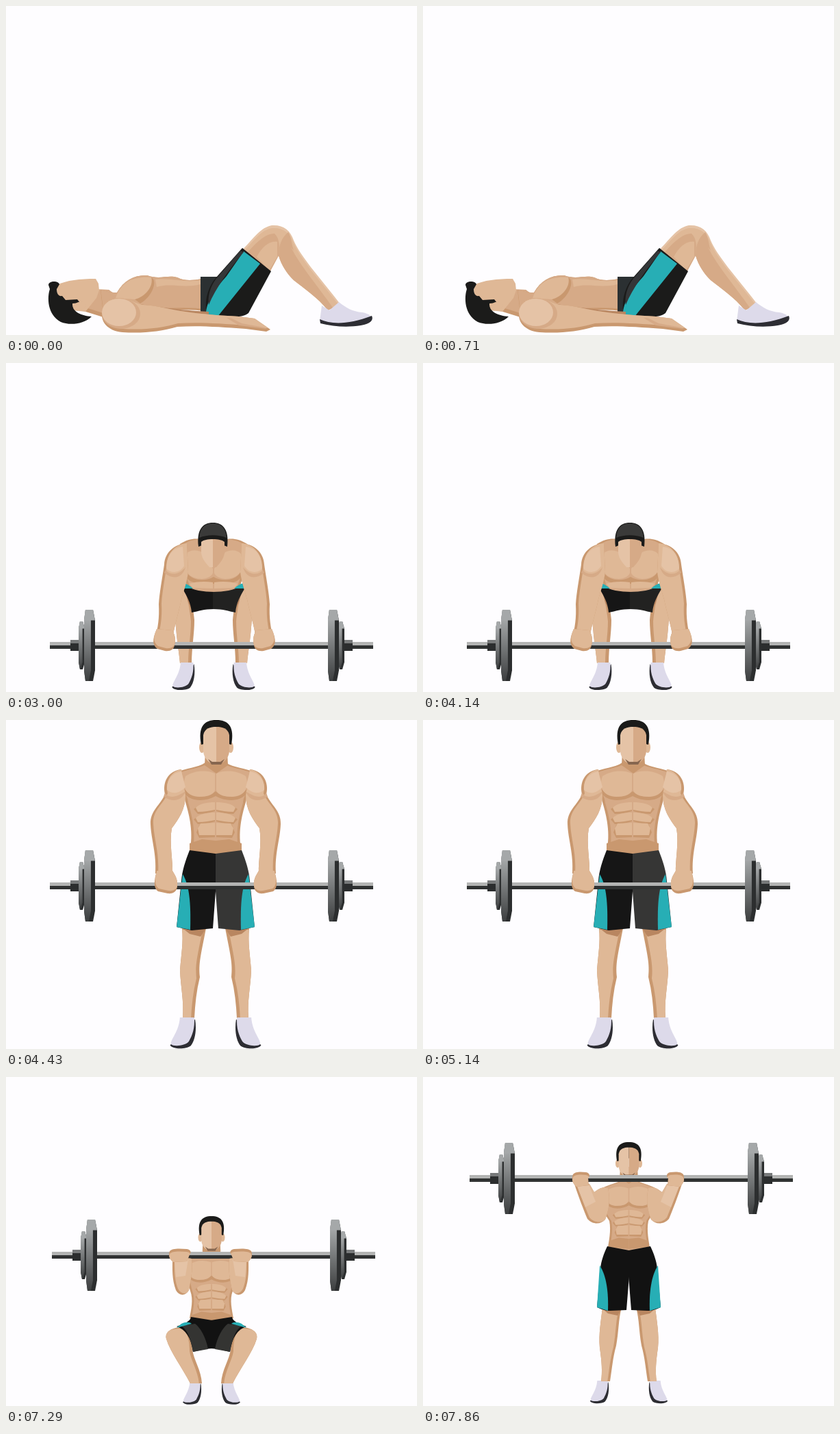
An HTML page with a canvas for the animation above (8000 ms loop, 600 px wide and 480 px high).

```html
<!DOCTYPE html>
<html>
<head>
<meta charset="utf-8">
<style>
  html, body { margin: 0; height: 100%; overflow: hidden; background: #fefdff; }
  canvas { display: block; width: 100%; height: 100%; }
</style>
</head>
<body>
<canvas id="stage" width="600" height="480"></canvas>
<script>
const ctx = document.getElementById('stage').getContext('2d');
const LIGHT = '#e5c3a6', SKIN = '#dfb896', MID = '#d6aa87', SHADE = '#c9986f', DEEP = '#b98660';
const BLACK = '#1b1b1a', TEAL = '#27aeb5', SHOE = '#dddaea', SOLE = '#2d2d33';
const LOOP = 8000;
let raised = false; // second pose of an exercise

const pick = (low, high) => raised ? high : low;

// Fills the path of the current pose; with `light`, a shifted copy leaves a shaded rim.
function shape(color, low, high = low, light, dx = 4, dy = 0) {
  const path = new Path2D(pick(low, high));
  ctx.fillStyle = color;
  ctx.fill(path);
  if (!light) return;
  ctx.save();
  ctx.clip(path);
  ctx.translate(dx, dy);
  ctx.fillStyle = light;
  ctx.fill(path);
  ctx.restore();
}

function oval(color, x, y, rx, ry, angle = 0) {
  ctx.fillStyle = color;
  ctx.beginPath();
  ctx.ellipse(x, y, rx, ry, angle, 0, 7);
  ctx.fill();
}

function at(x, y, sx, sy, draw) {
  ctx.save();
  ctx.translate(x, y);
  ctx.scale(sx, sy);
  draw();
  ctx.restore();
}

function both(cx, draw) {
  draw();
  at(2 * cx, 0, -1, 1, draw);
}

// ---------- lying figure ----------

function sideLeg() {
  at(pick(0, -1.5), pick(0, 2), 1, 1, () => {
    shape(LIGHT, 'M346 355 C362 338 372 323 388 320 C405 319 415 327 420 342 C425 354 434 366 445 381 C460 400 475 418 488 435 L470 444 C455 425 435 412 420 400 C410 390 402 378 398 364 L384 390Z',
      undefined, SKIN, 0, 4);
    shape(MID, 'M398 364 C398 350 402 338 412 330 C418 338 416 352 424 366 C440 388 462 416 478 440 L470 444 C455 425 435 412 420 400 C410 390 402 378 398 364Z');
    shape(SKIN, 'M416 352 C434 374 464 412 484 436 L477 440 C458 412 430 380 416 352Z');
    shape(MID, 'M352 360 C368 342 380 332 392 332 C402 342 398 356 398 364 L384 390Z');
    shape(SKIN, 'M366 366 C374 350 386 342 396 344 L396 366 L384 386Z');
  });
  shape(SHOE, 'M461 437 L472 444 L486 432 C496 440 506 446 520 447 C531 449 535 453 534 459 C510 467 480 466 458 460Z');
  shape(SOLE, 'M458 457 C475 465 500 465 534 452 C537 458 532 464 518 466 C500 469 478 468 459 463Z');
}

function sideShorts() {
  shape('#2b3032', 'M284 395 L309 395 L298 450 L284 446Z', 'M281 398 L306 399 L296 458 L281 450Z');
  shape(BLACK, 'M306 397 L345 353 L387 387 L354 448 C344 456 320 455 293 450 C289 430 295 410 306 397Z',
    'M303 400 L342 355 L386 394 L357 438 C346 470 310 474 288 464 C284 436 291 412 303 400Z');
  shape(TEAL, 'M347 358 L371 376 L309 453 L292 449 C292 432 306 412 322 394Z',
    'M345 358 L370 376 C352 398 336 416 322 437 L293 437 C300 415 314 394 326 380Z');
  shape('#343638', 'M342 357 L347 359 C325 385 306 412 296 436 C294 424 298 410 306 399Z',
    'M340 358 L345 359 C324 384 306 408 296 434 C292 422 296 412 303 401Z');
}

function sideHead() {
  shape(SKIN, 'M75 407 C88 400 108 398 131 398 L135 405 L136 415 L132 426 L116 446 L98 444 L80 430 C74 424 73 414 75 407Z',
    'M84 370 C90 362 112 362 132 367 L151 378 L147 389 L152 395 C146 406 132 412 116 410 L100 404 L84 382Z');
  shape(BLACK, 'M62 407 C62 401 76 400 78 406 L74 413 C74 420 77 424 82 423 L87 429 L104 428 L108 433 L97 434 C96 446 110 452 125 453 C113 465 92 466 80 461 C60 450 60 425 64 413Z',
    'M75 362 C78 355 88 354 93 362 C90 368 84 371 83 380 L98 384 L102 393 L112 393 L112 401 L102 402 C100 414 108 424 119 430 C100 436 78 426 68 410 C58 394 62 376 77 368Z');
  oval(SKIN, pick(107, 109), pick(438, 408), 9, 6, pick(-.35, -.2));
}

function crunch() {
  sideLeg();
  shape(SHADE, 'M118 413 L150 414 L168 428 L142 454 L110 444Z', 'M106 410 C124 412 142 406 150 394 L166 402 L140 441 L116 428Z', MID, 3, -5);
  sideHead();
  shape(SHADE, 'M138 414 C150 418 156 418 162 418 C172 400 188 392 206 393 C225 400 235 392 250 396 C262 402 274 400 286 398 L296 446 C260 440 230 446 200 444 L142 448Z',
    'M150 396 C153 398 155 398 158 396 C172 380 186 373 202 373 C222 374 233 382 240 389 C256 394 270 398 284 400 L292 446 C260 450 230 446 210 440 L142 438Z', MID, 0, -3);
  shape(SHADE, 'M188 428 C204 424 214 408 212 396 C222 400 214 424 196 434Z', 'M188 406 C226 404 242 398 236 386 C246 392 236 404 196 414Z');
  shape(SKIN, 'M160 426 C168 402 186 394 212 396 C216 408 204 424 188 428Z', 'M154 402 C168 380 206 364 235 384 C242 392 226 404 188 406Z');
  shape(SKIN, 'M218 399 C240 396 260 404 284 400 L284 406 C260 412 240 404 220 410Z', 'M238 396 C250 396 268 402 280 402 L280 412 C262 410 250 404 238 404Z');
  sideShorts();
  shape(DEEP, 'M186 434 C220 438 250 444 296 446 L296 450 L186 446Z', 'M196 412 C222 424 250 430 296 434 L296 438 L196 428Z');
  shape(SHADE, 'M150 430 C172 420 188 434 200 436 C222 437 238 443 262 446 C290 450 320 452 340 453 L363 456 L386 472 L380 475 L350 471 C310 468 280 466 250 468 C225 475 200 478 170 476 C148 474 136 460 141 442Z',
    'M156 420 C176 398 206 410 216 420 C236 418 248 428 270 430 C300 434 330 437 362 439 L405 441 L434 462 L428 465 L388 460 C350 459 320 462 280 464 C250 468 225 470 190 467 C168 466 148 458 152 436Z', SKIN, 1, -5);
  oval(MID, pick(168, 185), pick(449, 433), pick(28, 32), pick(22, 27));
  oval(LIGHT, pick(165, 185), pick(447, 431), pick(25, 30), pick(20, 24));
  shape(MID, 'M322 455 L362 457 L380 471 L340 466Z', 'M360 441 L402 443 L428 461 L364 458Z');
  shape(SKIN, 'M324 453 L361 456 L382 470 L344 463Z', 'M362 439 L404 442 L430 460 L366 454Z');
}

// ---------- front view parts ----------

function plate(x, half, width) {
  const bevel = half * .3;
  const face = w => `M2 ${-half} H${w - 3} L${w} ${bevel - half} V${half - bevel} L${w - 3} ${half} H2 L0 ${half - bevel} V${bevel - half}Z`;
  const sheen = ctx.createLinearGradient(0, -half, 0, half);
  sheen.addColorStop(0, '#b4b7b8');
  sheen.addColorStop(1, '#3c3e3f');
  at(x, 0, 1, 1, () => {
    shape('#2c2e2f', face(width));
    shape(sheen, face(width * .62));
    shape('#a5a8a9', `M2 ${-half} H${width - 3} L${width} ${bevel - half} H0Z`);
  });
}

function bar(cx, y) {
  at(cx, y, 1, 1, () => {
    shape('#b3b4b3', 'M-236 -5 H236 V0 H-236Z');
    shape('#303232', 'M-236 0 H236 V5 H-236Z');
    both(0, () => {
      shape('#2b2d2e', 'M-206 -8 H-193 V8 H-206Z');
      shape('#77797a', 'M-206 -8 H-193 V-3 H-206Z');
    });
    plate(-194, 35, 9);
    plate(185, 35, 9);
    plate(-186, 52, 16);
    plate(170, 52, 16);
  });
}

function frontHead(cx, top, s) {
  at(cx, top, s, s, () => {
    both(0, () => {
      shape(SHADE, 'M-16 46 L-17 66 L0 78 L0 46Z');
      oval(SKIN, -21, 40, 4, 8);
    });
    shape(BLACK, 'M-22 36 C-27 10 -18 0 0 0 C18 0 27 10 22 36 L0 30Z');
    const half = 'M0 10 C-9 10 -17 12 -19 22 L-19 46 C-18 57 -9 65 0 65Z';
    shape(LIGHT, half);
    at(0, 0, -1, 1, () => shape(MID, half));
    shape('#86664f', 'M-12 57 L-6 61 H6 L12 57 L7 65 H-7Z');
  });
}

function bowedHead(cx, top) {
  at(cx, top, 1, 1, () => {
    shape(BLACK, 'M-21 35 C-24 10 -15 0 0 0 C15 0 24 10 21 35 L16 33 H-16Z');
    shape('#3a3a39', 'M-20 22 C-19 8 -12 1 0 1 C12 1 19 8 20 22 C8 17 -8 17 -20 22Z');
    const half = 'M0 24 C-8 24 -13 25 -17 28 L-17 44 C-16 54 -8 61 -5 65 H0Z';
    shape(LIGHT, half);
    at(0, 0, -1, 1, () => shape(MID, half));
  });
}

function muscles(cx, top, sx, sy) {
  at(cx, top, sx, sy, () => both(0, () => {
    shape(SHADE, 'M-38 120 L-20 114 L0 116 L0 136 L-38 132Z');
    shape(SHADE, 'M-46 40 C-36 54 -14 56 0 44 L0 51 C-16 60 -38 59 -46 46Z');
    shape(SKIN, 'M-1 18 C-14 12 -32 14 -44 22 C-50 38 -42 52 -24 52 C-10 52 -2 48 -1 42Z');
    for (const y of [60, 75]) at(0, y, 1, 1, () => {
      shape(SHADE, 'M-1 2 C-12 2 -25 4 -32 10 L-26 17 C-16 17 -8 15 -1 13Z');
      shape(SKIN, 'M-1 0 C-12 0 -24 2 -29 8 L-26 14 C-16 14 -8 12 -1 11Z');
    });
    shape(SHADE, 'M-1 92 L-24 93 L-28 104 L-24 112 L-1 111Z');
    shape(SKIN, 'M-1 90 L-22 91 L-26 98 L-24 108 L-1 108Z');
  }));
}

function bentMuscles(cx) {
  both(cx, () => {
    shape(SHADE, 'M262 300 C266 318 290 320 303 312 L303 322 C286 324 266 322 262 310Z');
    shape(SKIN, 'M302 300 L286 276 C274 270 264 274 259 284 C258 304 268 315 286 315 C296 314 301 310 302 306Z');
    shape(SKIN, 'M302 320 C290 318 276 319 268 322 L272 328 L302 329Z');
  });
}

function frontShoe(x, y, s) {
  at(x, y, s, s, () => {
    shape(SOLE, 'M10 2 C12 14 10 26 5 32 C0 36 -16 36 -18 31 L0 16Z');
    shape(SHOE, 'M-7 0 H9 C10 12 7 20 3 27 C-1 32 -14 33 -17 30 C-18 25 -8 16 -7 0Z');
  });
}

// ---------- bar from floor to thighs ----------

function deadlift() {
  const cx = pick(303, 306);
  both(cx, () => {
    shape(SHADE, 'M248 328 C252 350 245 365 248 385 C250 410 253 425 254 438 L271 438 C271 415 275 395 275 375 C274 362 270 346 270 330Z',
      'M257 304 C259 325 256 340 254 365 C255 390 260 410 258 435 L275 435 C276 415 278 395 283 375 C281 355 284 345 292 304Z', SKIN, -5, 2);
    shape(DEEP, 'M262 334 L272 332 L273 362 L266 350Z', 'M258 304 L292 304 L284 316 L268 312Z');
    frontShoe(263, pick(437, 434), pick(1.15, 1.3));
    shape(SHADE, 'M304 257 L288 258 C278 255 266 256 254 264 C246 285 256 300 262 318 C264 324 264 328 264 334 L304 337Z',
      'M307 60 L291 62 C280 70 262 70 250 76 C252 100 262 110 262 120 C268 140 274 165 268 192 L307 196Z', MID, 4, 1);
  });
  if (raised) muscles(cx, 60, 1, 1);
  else bentMuscles(cx);
  const shorts = color => shape(color,
    'M304 334 C288 334 272 331 264 326 L257 328 C264 340 270 350 271 364 C282 362 288 359 304 359Z',
    'M306 195 L268 190 C262 205 257 220 256 235 L249 302 L271 307 L302 304 L306 250Z');
  shorts('#161616');
  at(2 * cx, 0, -1, 1, () => shorts(pick('#222221', '#363635')));
  both(cx, () => {
    shape(TEAL, 'M258 321 C264 322 269 325 273 329 L257 329Z', 'M258 225 C268 242 270 268 269 306 L249 302Z');
  });
  bar(300, pick(412, 242));
  both(pick(304, 306), () => {
    shape(SHADE, 'M264 263 C246 264 232 276 231 294 C228 315 224 335 223 352 C224 372 222 386 217 404 L243 404 C245 385 252 365 256 345 C260 330 264 320 266 305Z',
      'M256 72 C236 74 228 92 232 108 C226 124 210 132 211 152 C212 175 220 195 218 224 L243 224 C244 205 238 180 242 158 C252 145 262 130 262 110Z', SKIN, 4, -1);
    shape(LIGHT, 'M258 268 C242 270 234 282 234 300 C242 308 254 306 260 296Z', 'M256 75 C240 78 234 90 235 102 C244 110 254 106 262 98Z');
    shape(MID, 'M233 302 C240 310 252 310 262 298 C258 312 246 318 231 306Z', 'M232 106 C238 116 250 112 262 104 C258 116 246 122 230 112Z');
    shape(SHADE, 'M220 388 L243 390 C247 398 248 404 246 412 C245 418 240 421 232 420 L221 417 C214 412 213 404 220 388Z',
      'M220 220 L243 220 C248 228 251 234 250 242 C250 250 244 254 236 253 L222 250 C215 245 216 235 220 220Z', SKIN, 1, -4);
  });
  if (raised) frontHead(307, 0, 1);
  else bowedHead(302, 233);
}

// ---------- bar on the shoulders, squat and standing ----------

function frontSquat() {
  const cx = pick(300, 300.5), drop = pick(108, 0);
  both(cx, () => {
    frontShoe(pick(275, 261), pick(445, 443), pick(.94, .95));
    shape(SHADE, 'M262 365 C245 364 231 370 234 382 C240 402 258 425 269 447 L286 447 C285 428 274 412 272 398 C272 385 270 372 262 365Z',
      'M262 336 C260 355 256 375 258 395 C261 415 262 430 260 444 L273 444 C276 425 277 410 282 392 C286 370 285 355 290 336Z', SKIN, -4, 2);
    shape(DEEP, 'M262 366 L272 368 L274 400 L270 386Z', 'M262 338 L290 338 L284 348 L270 345Z');
    shape(SHADE, 'M301 255 L288 258 C277 261 270 263 265 268 C264 290 266 300 269 312 C274 325 270 340 268 352 L301 357Z',
      'M301 150 L288 152 C275 157 262 160 254 167 C258 190 266 200 272 210 C275 225 271 240 270 249 L301 254Z', MID, 3);
  });
  muscles(cx, 149 + drop, .74, .75);
  both(cx, () => {
    shape('#121212', 'M301 355 L270 350 C270 354 264 358 260 360 L249 364 C262 368 270 380 273 401 L290 397 L301 396Z',
      'M301 253 L269 247 C264 258 260 268 259 280 L254 336 C262 340 268 341 273 341 L297 340 L301 290Z');
    if (!raised) shape('#343432', 'M256 363 L276 360 C284 366 292 380 295 397 L273 401 C270 384 266 370 256 363Z');
    shape(TEAL, 'M256 360 C262 357 268 357 271 360 L249 366Z', 'M258 275 C268 290 271 315 270 341 L254 336Z');
  });
  frontHead(cx, 95 + drop, .78);
  bar(pick(303, 304), pick(260, 148));
  both(pick(298.5, 299.5), () => {
    shape(SHADE, 'M243 266 C243 280 242 295 248 311 C253 320 262 320 267 311 C270 295 273 282 271 265 C266 264 262 264 258 264Z',
      'M221 156 C227 175 235 195 240 207 C248 216 260 215 266 208 C271 195 274 180 270 162 C262 159 256 164 250 168 L243 156Z', SKIN, 3, -2);
    shape(LIGHT, 'M246 266 L266 266 L262 290 L248 292Z', 'M224 157 L242 157 L252 182 L237 190Z');
    shape(SHADE, 'M239 254 C242 250 252 250 264 251 C270 252 271 256 268 259 L264 269 L244 270 C238 265 237 260 239 254Z',
      'M219 142 C222 138 230 138 238 139 C244 140 244 145 241 148 L242 158 L224 160 C217 154 217 148 219 142Z', SKIN, 0, 4);
  });
}

// ---------- timeline: the poses change by hard cuts ----------

const poses = [
  { until: 1140, draw: crunch, raised: false },
  { until: 2710, draw: crunch, raised: true },
  { until: 4430, draw: deadlift, raised: false },
  { until: 6000, draw: deadlift, raised: true },
  { until: 7710, draw: frontSquat, raised: false },
  { until: LOOP, draw: frontSquat, raised: true },
];

function frame(now) {
  const pose = poses.find(p => now % LOOP < p.until);
  raised = pose.raised;
  ctx.fillStyle = '#fefdff';
  ctx.fillRect(0, 0, 600, 480);
  pose.draw();
  requestAnimationFrame(frame);
}
requestAnimationFrame(frame);
</script>
</body>
</html>
```
